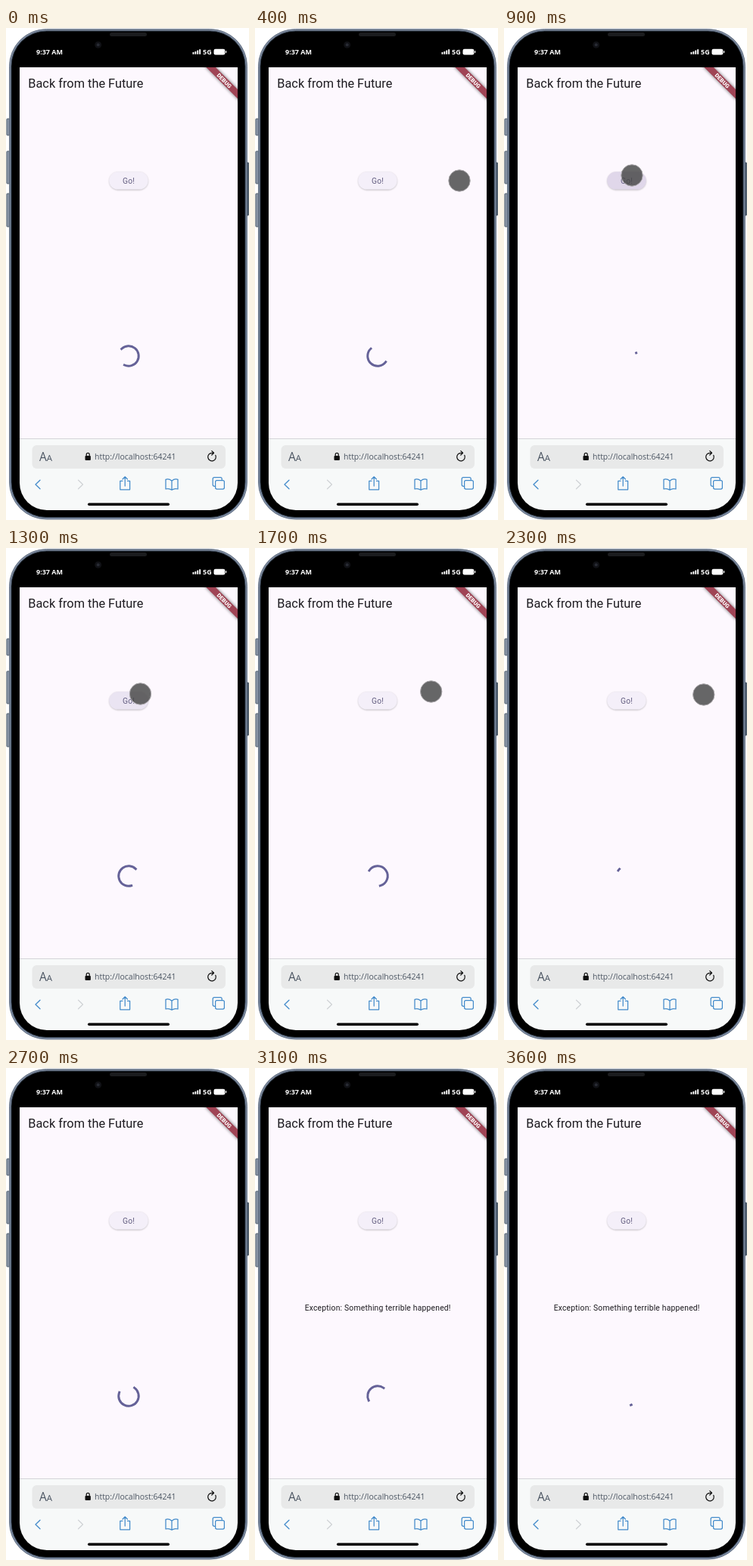
An HTML page that plays this animation: 321 px wide and 651 px high, repeating every 3.7 s.

```html
<!DOCTYPE html>
<html lang="en">
<head>
<meta charset="utf-8">
<title>Back from the Future</title>
<style>
  html, body { margin: 0; width: 100%; height: 100%; overflow: hidden; background: #fff; }
  svg { display: block; width: 321px; height: 651px; }
  .app { font-family: Roboto, sans-serif; fill: #1d1b20; }
  .sys { font-family: "Open Sans", "Noto Sans", sans-serif; }
  .line { fill: none; stroke-width: 1.25; stroke-linecap: round; stroke-linejoin: round; }
  .blue { stroke: #428aca; }
  .mid { text-anchor: middle; }
</style>
</head>
<body>
<svg viewBox="0 0 321 651">
  <defs>
    <clipPath id="screen">
      <path d="M18 52H306V602a36 36 0 0 1-36 36H54a36 36 0 0 1-36-36Z"/>
    </clipPath>
    <filter id="blur" x="-30%" y="-60%" width="160%" height="220%">
      <feGaussianBlur stdDeviation=".8"/>
    </filter>
    <filter id="soft" x="-30%" y="-120%" width="160%" height="340%">
      <feGaussianBlur stdDeviation="2"/>
    </filter>
    <linearGradient id="metal" x2="0" y2="1">
      <stop offset="0" stop-color="#7f8b9f"/>
      <stop offset=".5" stop-color="#76869a"/>
      <stop offset="1" stop-color="#7d8ca4"/>
    </linearGradient>
  </defs>

  <!-- phone body -->
  <g fill="#8995a6" stroke="#46535f" stroke-width=".8">
    <rect x=".9" y="120" width="4" height="22" rx="1"/>
    <rect x=".9" y="163" width="4" height="43" rx="1"/>
    <rect x=".9" y="219" width="4" height="44" rx="1"/>
    <rect x="317" y="178" width="3.6" height="70" rx="1" fill="#435264"/>
  </g>
  <rect x="4.5" y="1.5" width="314" height="648.5" rx="49" fill="url(#metal)" stroke="#566476" stroke-width=".8"/>
  <rect x="7" y="4" width="309" height="643.5" rx="46.5" fill="#000" stroke="#2d3947"/>
  <rect x="137" y="6" width="49" height="5" rx="2.5" fill="#1b1c1e"/>
  <circle cx="121.7" cy="22.3" r="4.5" fill="#101115"/>
  <circle cx="121.7" cy="22.3" r="2" fill="#282b34"/>

  <!-- status bar -->
  <g class="sys" fill="#fff" font-weight="700">
    <text x="40" y="34.5" font-size="9">9:37 AM</text>
    <text x="260" y="34.8" font-size="9">5G</text>
    <path d="M246.5 32h1.9v2.8h-1.9zM249.4 31h1.9v3.8h-1.9zM252.3 29.6h1.9v5.2h-1.9zM255.2 28.2h1.9v6.6h-1.9z"/>
    <rect x="274.5" y="27.8" width="14.8" height="7.6" rx="2.2"/>
    <rect x="290" y="30" width="1.2" height="3.2" rx=".6"/>
  </g>

  <g clip-path="url(#screen)">
    <rect x="18" y="52" width="288" height="492" fill="#fdf8fe"/>
    <text class="app" x="29.3" y="78.8" font-size="16.35">Back from the Future</text>

    <rect x="136.4" y="191" width="51.2" height="23.4" rx="11.7" fill="#000" opacity=".24" filter="url(#blur)"/>
    <rect id="button" x="136.2" y="190.2" width="51.5" height="23.4" rx="11.7" fill="#f4eff9"/>
    <text class="app mid" x="162" y="205.6" font-size="10.3" letter-spacing=".15" style="fill:#625d80">Go!</text>

    <text id="error" class="app mid" x="162.2" y="321" font-size="10.36" letter-spacing=".19">Exception: Something terrible happened!</text>
    <path id="arc" fill="none" stroke="#656298" stroke-width="2.95" stroke-linecap="square"/>

    <!-- corner ribbon -->
    <g transform="translate(306 52) rotate(45)">
      <rect x="-34" y="20.6" width="68" height="8.8" fill="#000" opacity=".55" filter="url(#soft)"/>
      <rect x="-34" y="20.6" width="68" height="8.8" fill="#a04455"/>
      <text class="app mid" y="27.7" font-size="7.5" font-weight="900" style="fill:#fff">DEBUG</text>
    </g>

    <!-- browser bar -->
    <rect x="18" y="543" width="288" height="96" fill="#f7f9f9"/>
    <path d="M18 543.5H306" stroke="#d4d5d8"/>
    <rect x="34.5" y="552" width="255.5" height="31" rx="6" fill="#e8e9e9"/>
    <g class="sys" fill="#4c5663">
      <text x="44" y="573" font-size="15.5">A<tspan font-size="11.5">A</tspan></text>
      <text x="117" y="571" font-size="10.5">http://localhost:64241</text>
    </g>
    <rect x="104.5" y="566" width="7.4" height="6" rx="1" fill="#111"/>
    <path class="line" stroke="#111" d="M106.2 566v-1.6a2 2 0 0 1 4 0v1.6"/>
    <path class="line" stroke="#111" d="M276.8 565.3a5.3 5.3 0 1 1-4.8-3h2.2M271.8 559.6l2.8 2.7-2.8 2.7"/>

    <path class="line blue" d="M45 598.2l-6 5.8 6 5.8"/>
    <path class="line" stroke="#d0d3d6" d="M95.5 598.2l6 5.8-6 5.8"/>
    <g class="line blue">
      <path d="M154 599.3h-3.2v11.5h12.8v-11.5h-3.2M157.2 606v-12M154 597l3.2-3.2 3.2 3.2"/>
      <path d="M219 599.2q-3.8-3.2-8-1.8v12.6q4.2-1.4 8 1.2q3.8-2.6 8-1.2v-12.6q-4.2-1.4-8 1.8v12"/>
      <path d="M276.6 606.3h-1.4a2 2 0 0 1-2-2v-7.6a2 2 0 0 1 2-2h8a2 2 0 0 1 2 2v1.8"/>
      <rect x="276.6" y="598.7" width="11.8" height="11.4" rx="2"/>
    </g>
    <rect x="108" y="628.6" width="108" height="3.4" rx="1.7" fill="#000"/>

    <circle id="touch" r="14.2" fill="rgba(70,70,70,.82)" stroke="#a8a5a9"/>
  </g>
</svg>

<script>
const LOOP = 3700, STEP = 100;
const CYCLE = 1333, SPIN = 2222;      // sweep and rotation periods, ms
const START = 885, START_ANGLE = -21.5; // a sweep begins here, at this angle
const $ = id => document.getElementById(id);

// touch path: time, x, y
const touchPath = [
  [300, 300, 207], [400, 270, 202], [500, 228, 198], [600, 192, 196], [700, 172, 195],
  [900, 169, 195], [1200, 170, 194], [1400, 185, 192], [1700, 232.7, 190],
  [2000, 254, 192], [2300, 263.8, 194], [2400, 284, 196]
];

// cubic-bezier(.4, 0, .2, 1), clamped
function ease(x) {
  if (x <= 0) return 0;
  if (x >= 1) return 1;
  let lo = 0, hi = 1;
  for (let i = 0; i < 24; i++) {
    const u = (lo + hi) / 2, v = 1 - u;
    if (1.2 * u * v * v + 0.6 * u * u * v + u ** 3 < x) lo = u; else hi = u;
  }
  return lo * lo * (3 - 2 * lo);
}

function drawArc(t) {
  const since = t - START, turn = Math.floor(since / CYCLE);
  const phase = since / CYCLE - turn;
  const head = 270 * ease(phase * 2);
  const tail = 270 * ease(phase * 2 - 1);
  const from = START_ANGLE + since * (360 / SPIN + 90 / CYCLE) + 270 * turn + tail;
  const sweep = Math.max(head - tail, 0.5);
  const point = deg => {
    const a = deg * Math.PI / 180;
    return (162 + 13.25 * Math.cos(a)).toFixed(3) + " " + (434 + 13.25 * Math.sin(a)).toFixed(3);
  };
  $("arc").setAttribute("d",
    `M${point(from)}A13.25 13.25 0 ${sweep > 180 ? 1 : 0} 1 ${point(from + sweep)}`);
}

function drawTouch(t) {
  const last = touchPath[touchPath.length - 1];
  const shown = t >= touchPath[0][0] && t <= last[0];
  $("touch").style.display = shown ? "" : "none";
  if (!shown) return;
  const i = Math.max(1, touchPath.findIndex(p => p[0] >= t));
  const [a, b] = [touchPath[i - 1], touchPath[i]];
  const k = (t - a[0]) / (b[0] - a[0]);
  $("touch").setAttribute("cx", a[1] + (b[1] - a[1]) * k);
  $("touch").setAttribute("cy", a[2] + (b[2] - a[2]) * k);
}

function buttonColor(t) {
  if (t >= 900 && t < 1200) return "#e0d7ea";
  if (t >= 600 && t < 1500) return "#eae4f2";
  return "#f4eff9";
}

function draw(now) {
  const t = Math.floor(now % LOOP / STEP) * STEP;
  drawArc(t);
  drawTouch(t);
  $("button").setAttribute("fill", buttonColor(t));
  $("error").style.display = t >= 3000 ? "" : "none";
}

const origin = performance.now();
function tick() {
  draw(performance.now() - origin);
  requestAnimationFrame(tick);
}
tick();
</script>
</body>
</html>
```
